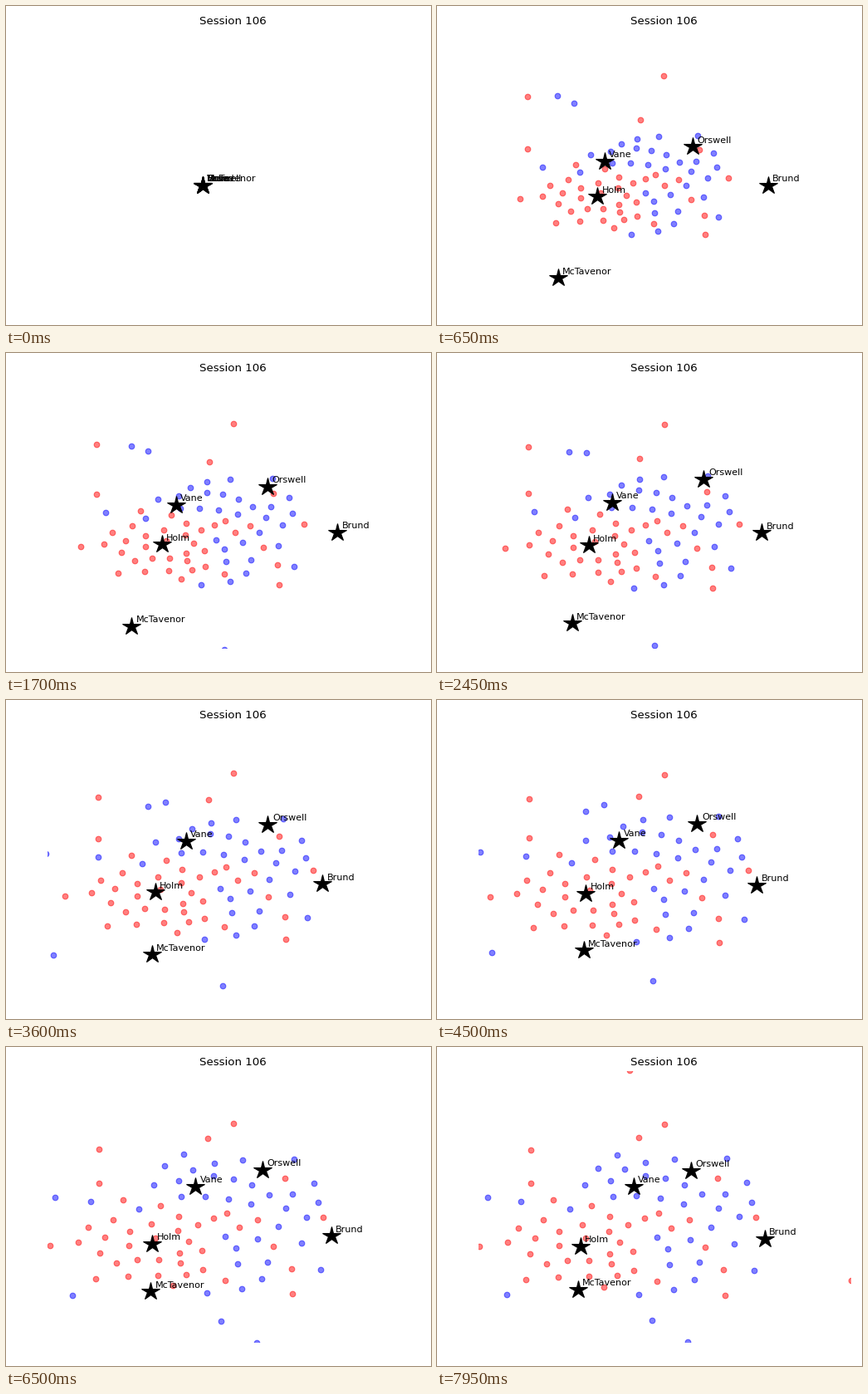
These frames come from a looping animation (512x384 px, 8 s). A matplotlib script:

```python
import numpy as np
import matplotlib.pyplot as plt
from matplotlib.animation import FuncAnimation

W, H, DPI = 512, 384, 80
LOOP, STEP = 8000, 50
LEFT, RIGHT, TOP, BOTTOM = 49.5, 497.5, 29, 355
CENTRE = np.array([237.0, 216.0])
OPEN, SETTLED = 1150, 7950          # ms: end of the burst, end of the drift
SQUEEZE = np.array([0.78, 0.75])    # size of the opened cloud, x and y


def arc(start, middle, end, n):
    """n dots along the parabola through three points."""
    a, b, c = (np.array(p, float) for p in (start, middle, end))
    s = np.linspace(0, 1, n)[:, None]
    return (2 * (s - 0.5) * (s - 1) * a + 4 * s * (1 - s) * b
            + 2 * s * (s - 0.5) * c)


def burst(t, tau):
    """Fast spread out of the centre, 0 to 1."""
    return 1 - np.exp(-max(t - STEP, 0) / tau)


def drift(t):
    """Slow relaxation from the opened to the settled layout, 0 to 1."""
    return np.sin(np.pi / 2 * np.clip((t - OPEN) / (SETTLED - OPEN), 0, 1))


class Party:
    """A cloud that widens about its hub, plus strays going from far to home."""

    def __init__(self, color, hub, arcs, loners, strays):
        self.settled = np.vstack([arc(*a) for a in arcs] + [loners])
        self.opened = hub + (self.settled - hub) * SQUEEZE
        self.far, self.home = np.array(strays, float).transpose(1, 0, 2)
        self.dots, = ax.plot([], [], "o", color=color, alpha=0.5, ms=6)

    def move(self, t):
        u = drift(t)
        cloud = self.opened + (self.settled - self.opened) * u
        strays = self.far + (self.home - self.far) * u
        place(self.dots, np.vstack([
            CENTRE + (cloud - CENTRE) * burst(t, 180),
            CENTRE + (strays - CENTRE) * burst(t, 20)]))


def place(dots, xy):
    dots.set_data(xy[:, 0] - 0.5, xy[:, 1] - 0.5)


fig = plt.figure(figsize=(W / DPI, H / DPI), dpi=DPI, facecolor="white")
ax = fig.add_axes([LEFT / W, 1 - BOTTOM / H, (RIGHT - LEFT) / W, (BOTTOM - TOP) / H])
ax.set_xlim(LEFT, RIGHT)
ax.set_ylim(BOTTOM, TOP)
ax.axis("off")
ax.set_title("Session 106", fontsize=12)

red = Party(
    "red", (255, 212),
    arcs=[((51, 240), (118, 230), (175, 214), 5),
          ((112, 249), (207, 222), (267, 200), 7),
          ((132, 261), (197, 259), (265, 282), 6),
          ((107, 280), (165, 277), (217, 275), 4),
          ((236, 246), (214, 239), (201, 289), 4),
          ((347, 299), (337, 254), (282, 218), 4)],
    loners=[(98, 218), (128, 208), (140, 184), (186, 191), (208, 204),
            (304, 208), (384, 205), (338, 158), (243, 109)],
    strays=[((109, 109), (113, 124)), ((109, 172), (113, 164)),
            ((274, 84), (274, 93)), ((228, -60), (232, 28)),
            ((575, 295), (499, 281))])

blue = Party(
    "blue", (205, 215),
    arcs=[((209, 161), (238, 143), (286, 135), 4),
          ((251, 155), (298, 166), (339, 194), 5),
          ((212, 180), (255, 181), (297, 189), 4),
          ((349, 134), (379, 187), (330, 217), 5),
          ((305, 232), (310, 280), (243, 298), 5),
          ((265, 229), (278, 243), (280, 262), 3)],
    loners=[(101, 186), (160, 195), (178, 166), (347, 177), (358, 237),
            (382, 269)],
    strays=[((145, 108), (194, 146)), ((165, 117), (217, 130)),
            ((34, 190), (61, 181)), ((26, 318), (84, 298)),
            ((264, 362), (259, 329)), ((303, 378), (302, 355))])

# Where each leader stands at a few moments.
MOMENTS = (OPEN, 2450, 3600, 5400, SETTLED)
LEADERS = {
    "Vane": [(201, 186), (211, 180), (217, 170), (222, 168), (237, 168)],
    "Holm": [(192, 230), (183, 232), (180, 232), (179, 235), (173, 240)],
    "Orswell": [(311, 168), (322, 152), (316, 150), (312, 148), (306, 149)],
    "Brund": [(405, 216), (392, 217), (382, 222), (390, 225), (395, 231)],
    "McTavenor": [(143, 332), (163, 326), (176, 307), (178, 297), (170, 292)],
}
stars, = ax.plot([], [], "*", color="black", ms=20)
labels = [ax.text(0, 0, name, fontsize=10) for name in LEADERS]


def lead(t, path):
    spot = np.array([np.interp(t, MOMENTS, axis) for axis in zip(*path)])
    return CENTRE + (spot - CENTRE) * burst(t, 180)


def draw(frame):
    t = frame * STEP
    red.move(t)
    blue.move(t)
    heads = np.array([lead(t, path) for path in LEADERS.values()])
    place(stars, heads)
    for label, (x, y) in zip(labels, heads):
        label.set_position((x + 5, y - 5))
    return [red.dots, blue.dots, stars, *labels]


anim = FuncAnimation(fig, draw, frames=LOOP // STEP, interval=STEP,
                     repeat=True, repeat_delay=0, blit=False)
plt.show()
```
